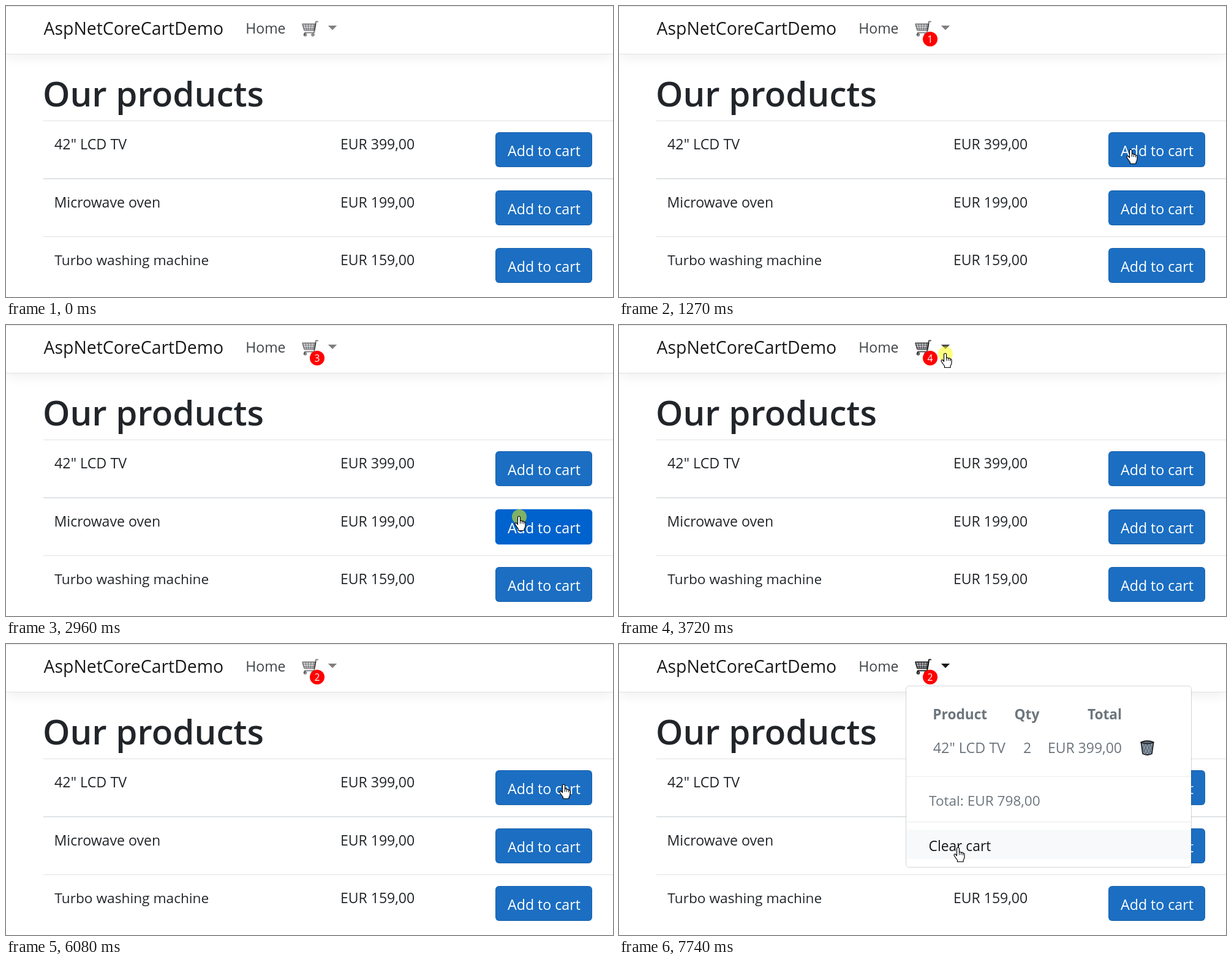
Write an HTML page with a canvas that moves like this. It is 991 px wide and 475 px high and loops after 8000 ms.

```html
<!DOCTYPE html>
<html lang="en">
<head>
<meta charset="utf-8">
<title>Cart demo</title>
<style>
html, body { margin: 0; width: 100%; height: 100%; overflow: hidden; background: #fff; }
canvas { display: block; }
</style>
</head>
<body>
<canvas id="stage" width="991" height="475"></canvas>
<script>
const ctx = document.getElementById('stage').getContext('2d');
const LOOP = 8000, STEP = 70;
const INK = '#212529', MUTED = '#6c757d';

// Bursts of activity; inside each the screen refreshes every STEP ms.
const bursts = [0, 310, 1130, 1730, 2070, 2960, 3230, 4980, 5940, 6360, 7050, 7390];

// Pointer moves: start, steps, x, y of the fingertip at the end.
const moves = [
  [310, 1, 903, 436], [380, 5, 842, 199], [730, 2, 836, 235],
  [2070, 3, 838, 313], [3230, 8, 533, 47], [4980, 1, 535, 52],
  [5050, 9, 911, 230], [6360, 8, 533, 48], [7390, 5, 553, 326], [7740, 1, 554, 333]
];

// Button index, from, to.
const hovers = [
  [2, 310, 450], [1, 450, 520], [0, 590, 1270],
  [1, 2280, 2630], [1, 3230, 3300], [0, 6360, 6500]
];
const presses = [[0, 1130, 1270], [0, 1730, 1870], [1, 2490, 2630], [1, 2960, 3100]];
const clicks = [...presses, [-1, 3720, 3790], [-1, 5940, 6080], [-1, 7050, 7120]];

const counts = [[0, 0], [1270, 1], [1870, 2], [2630, 3], [3100, 4], [6080, 2]];
const products = [
  { name: '42" LCD TV', price: 'EUR 399,00', size: 23.3, x: 0, y: 206 },
  { name: 'Microwave oven', price: 'EUR 199,00', size: 23.1, x: -0.5, y: 301 },
  { name: 'Turbo washing machine', price: 'EUR 159,00', size: 22.7, x: 0.3, y: 395 }
];

const within = (t, a, b) => t >= a && t < b;
const active = (list, t, id) => list.find(e => (id === undefined || e[0] === id) && within(t, e[1], e[2]));
const inBox = (p, x, y, w, h) => within(p.x, x, x + w) && within(p.y, y, y + h);

function snap(t) {
  const start = bursts.filter(b => b <= t).pop();
  return start + Math.floor((t - start) / STEP) * STEP;
}

function pointerAt(t) {
  let x = 903, y = 436;
  for (const [at, steps, toX, toY] of moves) {
    if (t < at) break;
    const k = Math.min(1, (Math.floor((t - at) / STEP) + 1) / steps);
    const e = k * k * (3 - 2 * k);
    x += (toX - x) * e;
    y += (toY - y) * e;
  }
  return { x, y };
}

function text(str, x, y, size = 23, color = INK, weight = 400, align = 'left') {
  ctx.font = `${weight} ${size}px "Open Sans", "Noto Sans", sans-serif`;
  ctx.fillStyle = color;
  ctx.textAlign = align;
  ctx.fillText(str, x, y);
}

function rect(x, y, w, h, color) {
  ctx.fillStyle = color;
  ctx.fillRect(x, y, w, h);
}

function round(x, y, w, h, r, fill) {
  ctx.beginPath();
  ctx.roundRect(x, y, w, h, r);
  ctx.fillStyle = fill;
  ctx.fill();
}

function circle(x, y, r, fill) {
  ctx.beginPath();
  ctx.arc(x, y, r, 0, Math.PI * 2);
  ctx.fillStyle = fill;
  ctx.fill();
}

function shape(d, x, y, fill, stroke, width = 1) {
  const path = new Path2D(d);
  ctx.save();
  ctx.translate(x, y);
  if (fill) {
    ctx.fillStyle = fill;
    ctx.fill(path);
  }
  if (stroke) {
    ctx.strokeStyle = stroke;
    ctx.lineWidth = width;
    ctx.lineJoin = ctx.lineCap = 'round';
    ctx.stroke(path);
  }
  ctx.restore();
}

function cartIcon(alpha) {
  ctx.save();
  ctx.globalAlpha = alpha;
  shape('M1 5.5H22.5L20.5 15.5H4Z', 483, 24, '#b9bcc4', '#111', 1.8);
  shape('M6 6L7.5 15M10.5 6L11 15M15 6L14.5 15M19.5 6L18 15M2 9H22M3 12.5H21', 483, 24, null, '#222', 1);
  shape('M26 1.5H23L20 19.5H5L4 23', 483, 24, null, '#111', 2.2);
  for (const x of [488.5, 501]) {
    circle(x, 47, 2.8, '#111');
    circle(x, 47, 1, '#aaa');
  }
  shape('M0 0H14.4L7.2 7.2Z', 525.8, 32, '#000');
  ctx.restore();
}

function trashIcon(x, y) {
  shape('M1.5 4L4 22Q11.5 26 19 22L21.5 4Z', x, y, '#8b9aa8', '#1c1f24', 1.8);
  shape('M6 6L14 23M11 6L18 20M16 6L19 12M4 11L9 23M17 6L9 23M12 6L5 20M7 6L4 12M19 11L14 23',
    x, y, null, '#4b5663', 0.9);
  shape('M1 3.5Q11.5 -1 22 3.5Q11.5 8 1 3.5Z', x, y, '#6b7884', '#1c1f24', 1.8);
}

function navbar(open, hot, t) {
  ctx.save();
  ctx.shadowColor = 'rgba(0,0,0,.06)';
  ctx.shadowBlur = 18;
  ctx.shadowOffsetY = 6;
  rect(0, 0, 991, 79, '#fff');
  ctx.restore();
  rect(0, 0, 991, 1, '#e3e3e3');
  rect(0, 78, 991, 1, '#dfe1e4');
  text('AspNetCoreCartDemo', 61.5, 47, 28.4, '#1a1a1a');
  text('Home', 391.3, 45, 23, '#3f4448');
  cartIcon(open ? 0.9 : hot ? 0.7 : 0.5);

  const count = counts.filter(c => c[0] <= t).pop()[1];
  if (count) {
    circle(508, 54, 12, '#f00');
    text(count, 508, 60, 15.6, '#fff', 400, 'center');
  }
}

function button(id, y, t) {
  const press = active(presses, t, id), hover = active(hovers, t, id);
  if (press) {
    const r = Math.min(4.8, (t - press[1] + 20) / 150 * 4.8);
    round(799 - r, y - r, 158 + 2 * r, 57 + 2 * r, 6 + r, 'rgba(38,143,255,.5)');
  }
  round(799, y, 158, 57, 6, '#1861ac');
  round(800, y + 1, 156, 55, 5, '#1b6ec2');
  if (hover) {
    ctx.globalAlpha = Math.min(1, (t - hover[1] + 20) / 150);
    round(799, y, 158, 57, 6, '#0069d9');
    ctx.globalAlpha = 1;
  }
  if (press) round(799, y, 158, 57, 6, '#0062cc');
  text('Add to cart', 819, y + 38.7, 23.2, '#fff');
}

function page(t) {
  text('Our products', 60, 164, 56.5, INK, 600);
  rect(61, 187, 930, 1, '#dee2e6');
  rect(61, 281, 930, 2, '#e0e3e6');
  rect(61, 376, 930, 1, '#dee2e6');
  products.forEach((p, i) => {
    text(p.name, 79 + p.x, p.y + 28, p.size);
    text(p.price, 546, p.y + 28);
    button(i, p.y, t);
  });
}

function menu(rows, hot) {
  const dx = rows === 1 ? -54 : 0, dy = rows === 1 ? -60.5 : 0;
  const right = 989 + dx, bottom = Math.round(425 + dy);
  round(469, 69, right - 470, bottom - 70, 5, '#fff');
  // The translucent border lets the page show through.
  ctx.beginPath();
  ctx.roundRect(468.5, 68.5, right - 469, bottom - 69, 5.5);
  ctx.lineWidth = 1;
  ctx.strokeStyle = 'rgba(0,0,0,.16)';
  ctx.stroke();

  text('Product', 512.3, 123, 22.7, MUTED, 700);
  text('Qty', 699.5 + dx, 123, 22.7, MUTED, 700);
  text('Total', 875 + dx, 123, 22.7, MUTED, 700, 'right');
  products.slice(0, rows).forEach((p, i) => {
    const y = 178 + i * 60;
    text(p.name, 512.8 + p.x, y, p.size, MUTED);
    text('2', 720.5 + dx, y, 23, MUTED, 400, 'center');
    text(p.price, 875 + dx, y, 23, MUTED, 400, 'right');
    trashIcon(905 + dx, y - 21);
  });
  rect(469, Math.floor(277 + dy), right - 470, 1, '#e9ecef');
  rect(469, Math.ceil(350 + dy), right - 470, 1, '#e9ecef');
  text(rows === 1 ? 'Total: EUR 798,00' : 'Total: EUR 1196,00', 506, 324 + dy, 22.6, MUTED);
  if (hot) rect(469, 303, right - 470, 48, '#f8f9fa');
  text('Clear cart', 505.5, 398 + dy, 22.8, hot ? '#16181b' : INK);
}

function pointer(p, hand, click) {
  if (click) circle(p.x, p.y, 12, 'rgba(255,255,0,.5)');
  const x = p.x - 0.5, y = p.y - 1;
  if (hand) {
    shape('M-2 1.5Q0 -1 2 1.5V8Q4 6.3 5 8.5Q7 7.2 8 9.5Q10.5 9 10.5 11.5V16Q10 19 8.5 21V23.5H-1V21' +
      'Q-4 17 -6.5 13Q-6.5 10.3 -4.3 11L-2 13.5Z', x, y, '#fff', '#000', 1.2);
    shape('M2 8V12M5 8.5V12M8 9.5V12.5', x, y, null, '#000', 1);
  } else {
    shape('M0 0V16.5L3.8 13L6.3 18.7L8.8 17.6L6.3 12H11.5Z', x, y, '#fff', '#000', 1);
  }
}

function draw(now) {
  const t = snap(now % LOOP);
  const p = pointerAt(t);
  const rows = within(t, 3790, 6080) ? 2 : t >= 7120 ? 1 : 0;
  const onCart = t >= 310 && inBox(p, 478, 10, 70, 56);
  const onClear = rows === 1 && inBox(p, 469, 303, 465, 48);
  const onTrash = rows === 2 && inBox(p, 900, 210, 32, 40);
  const onButton = !rows && products.some(b => inBox(p, 799, b.y, 158, 57));

  rect(0, 0, 991, 475, '#fff');
  navbar(rows > 0, onCart, t);
  page(t);
  if (rows) menu(rows, onClear);
  if (t >= 310) pointer(p, onCart || onClear || onTrash || onButton, active(clicks, t));
}

function loop() {
  draw(performance.now());
  requestAnimationFrame(loop);
}
loop();
</script>
</body>
</html>
```
